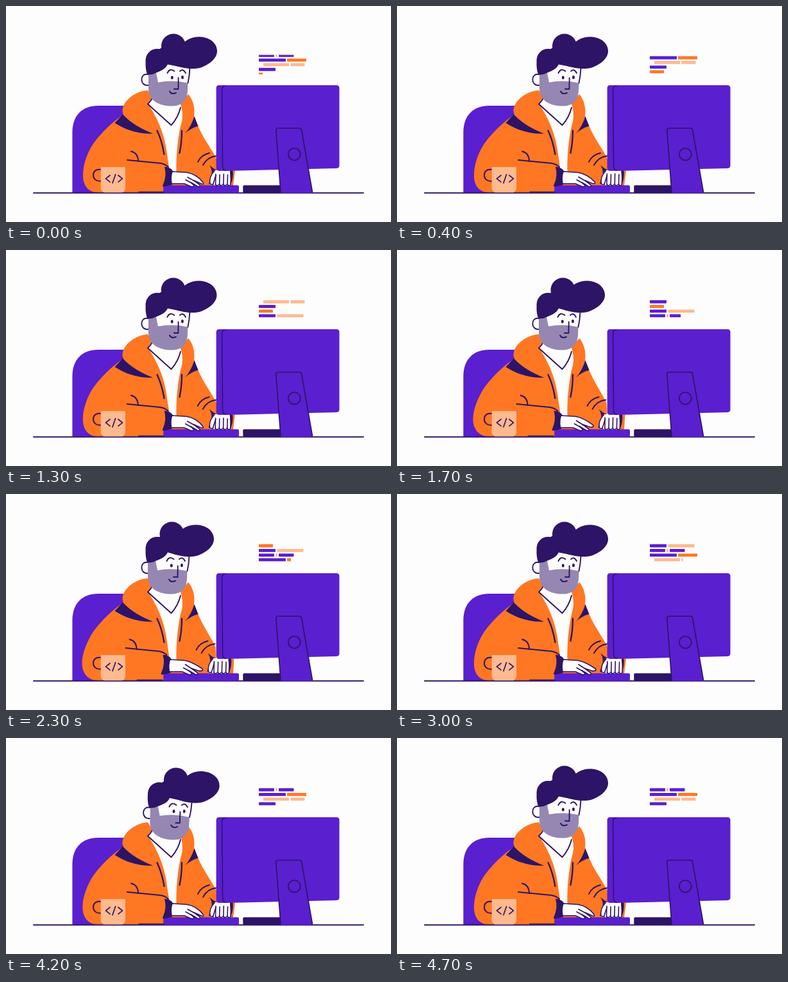
These frames come from a looping animation (600x338 px, 4800 ms). An HTML page with a canvas:

```html
<!DOCTYPE html>
<html lang="en">
<head>
<meta charset="utf-8">
<title>Developer at work</title>
<style>
html, body { margin: 0; width: 100%; height: 100%; overflow: hidden; background: #fefdfe; }
canvas { display: block; width: 600px; height: 338px; }
</style>
</head>
<body>
<canvas id="stage"></canvas>
<script>
const LOOP = 4800, STEP = 100;
const BG = '#fefdfe', PURPLE = '#5a1fcf', DARK = '#2d1466', ORANGE = '#ff7722',
      PEACH = '#ffb98e', BEARD = '#9587b2';

const canvas = document.getElementById('stage');
const ratio = window.devicePixelRatio || 1;
canvas.width = 600 * ratio;
canvas.height = 338 * ratio;
const c = canvas.getContext('2d');
c.scale(ratio, ratio);
c.lineCap = c.lineJoin = 'round';

function fill(d, color) {
  c.fillStyle = color;
  c.fill(new Path2D(d));
}
function line(d, width = 1.9, color = DARK) {
  c.strokeStyle = color;
  c.lineWidth = width;
  c.stroke(new Path2D(d));
}
function oval(x, y, rx, ry, color) {
  c.beginPath();
  c.ellipse(x, y, rx, ry, 0, 0, Math.PI * 2);
  c.fillStyle = color;
  c.fill();
}
function box(x, y, w, h, r, color) {
  c.beginPath();
  c.roundRect(x, y, w, h, r);
  c.fillStyle = color;
  c.fill();
}
function shifted(x, y, draw) {
  c.save();
  c.translate(x, y);
  draw();
  c.restore();
}
const clamp = v => Math.max(0, Math.min(1, v));
function ease(t, from, to) {
  const k = clamp((t - from) / (to - from));
  return k * k * (3 - 2 * k);
}

// Each row of code is a list of bars: x, width, colour
const rows = [
  [[394, 24, PURPLE], [420, 3, PEACH], [425, 23.5, PURPLE]],
  [[394, 42, PURPLE], [438, 30, ORANGE]],
  [[401, 40, PEACH], [443.5, 22, PEACH]],
  [[394, 26, PURPLE]],
  [[394, 22, ORANGE]],
  [[394, 26, PURPLE], [422.5, 41, PEACH]]
];
const starts = [-95, 600, 1400, 2070, 2765, 3380];
const SHOWN = 4, PITCH = 7.3;

function drawCode(t) {
  const scroll = starts.reduce((sum, s) => sum + ease(t, s, s + 190), 0);
  c.save();
  c.beginPath();
  c.rect(390, 76.5, 90, 30.5);
  c.clip();
  for (let i = 0; i < SHOWN + starts.length; i++) {
    const bars = rows[i % rows.length];
    const first = bars[0][0], last = bars[bars.length - 1];
    const typed = i < SHOWN ? 1 : clamp((t - starts[i - SHOWN]) / 340);
    const end = first + (last[0] + last[1] - first) * typed;
    const y = 81 + PITCH * (i - scroll);
    for (const [x, w, color] of bars) {
      const seen = Math.min(w, end - x);
      if (seen > 0) box(x, y - 2.4, seen, 4.8, 0.7, color);
    }
  }
  c.restore();
}

function drawBody(sway, lean) {
  const l = 120 - 1.5 * lean, r = -1.5 * sway;
  fill(`M221 132 C205 132 181 147 181.5 165 Q182 168 183 170
    C164 182 141 206 132 222 C124 237 ${l} 251 ${l} 265 C${l} 281 128 292 145 292
    L248 292 L248 281 L354 281 L${357 + r} 258 L${329 + r} 258 L${328 + r} 239
    C${322 + r} 226 306 205 299.5 188 L293 173 C295 158 291 146 284 138 L270 155 L235 155 Z`, ORANGE);
  fill('M228 143 L221 153 C233 170 246 196 250 225 L255 259 L265.5 259 C265 238 267 211 272 188 C276 176 276 166 272 153 L240 150 Z', BG);
  line('M228 144 Q226 149 221 153.5 L257.5 186.5 Q268 175 272 159');
  fill('M169.5 183 L182 169.5 C194 183 212 193 229 199.5 C208 201 186 194 169.5 183Z', DARK);
  fill('M293.5 172.5 L299.5 188 Q288 191 279 199.5 Q289 188 293.5 172.5Z', DARK);
  line('M235.5 195 Q243 211 246.5 232', 2.3);
  line('M274 195 Q274 213 270.5 230', 2.3);
}

function drawArms(sway) {
  shifted(-2.5 * sway, 0, () => {
    line('M195 227.5 Q206 230 206 243');
    line('M189 241 L240 246 Q248 247 253 252');
    line('M207 291 H246', 1.7);
    fill('M247 251.5 Q257 252 260.5 259 Q256 269 259 280 L247 282.5 Q243 283 244.5 280 Q251 266 247 251.5Z', DARK);
    line('M299 244 Q304 233 317 230');
    line('M307 249 Q314 236 328 234.5');
    fill('M317 249 Q323 258 319.5 267 L316 278 L321 280 L350 280 Q355 269 353.5 257 H329 Q322 254 317 249Z', DARK);
  });
  line('M148 256 C132 253 132 276 148 274', 1.9);
}

function drawHands(sway, open) {
  shifted(-3.5 * sway, 0, () => {
    const o = open * 2.5;
    const palm = `M259 259 L282 260.5 C291 262 300 267 ${307 + o} ${276 - o}
      Q${309 + o} ${280 - o} 304 ${278 - o / 2} L293 273 L302 280 Q303 284 298 282
      L288 276 L293 281 Q292 284 287 282 L278 278 L258 278 Q256 268 259 259Z`;
    fill(palm, BG);
    line(palm, 1.6);
    line(`M283 ${268 - o / 2} L294 274`, 1.6);
    line('M280 272 L289 277', 1.6);
  });
  shifted(-3.5 * sway + open, 0, () => {
    fill('M325 257 C319 263 317 272 318 279 Q321 282 323 279 L326 281 L349 281 Q351 281 350 270 L349 257Z', BG);
    line('M325 258 C319 264 317 272 318 278 Q321 281 323 278 L327 265', 1.6);
    for (let i = 0; i < 4; i++) {
      const x = 326.5 + i * 6.2;
      line(`M${x} 280 L${x + 0.4} ${263 + i % 2 - open}`, 1.6);
      line(`M${x} 279 Q${x + 2.7} 283 ${x + 5} 279`, 1.4);
    }
    line('M350 259 Q351 270 350 279', 1.6);
  });
}

function drawHair(sway) {
  fill('M217.8 84 C217 94 218 102 220.5 107.5 Q228 108 234 104.5 Q246 101 250 91 L280 97 L290 70 L262 50 L236 70Z', DARK);
  oval(235.5, 84.5, 17.8, 17.5, DARK);
  oval(261 - 2.5 * sway, 62.5, 19, 19, DARK);
  shifted(-5 * sway, 0, () => {
    fill(`M270 66 C279 51 293 47 305 48.5 C319 50 329 59 329 70.5
      C329 82 317 91 306 95.5 C292 101 272 97 255 90Z`, DARK);
  });
}

function drawHead(sway, nod, shut) {
  c.save();
  c.translate(225 + 4.4 * nod, 135 + 4 * nod);
  c.rotate(0.048 * nod);
  c.translate(-225, -135);

  fill('M223 107 C208 103 208 127 222 124Z', BG);
  line('M221.5 107 C208 104 208 126 221.5 124');
  fill('M223 90 H286 L283 130 H223Z', BG);
  shifted(-sway, 0, () => {
    fill(`M222 105 L234 104 L237 119.5 Q260 115 283.5 120.5 L283 133
      C282 149 274 156.5 258 156.5 C240 156.5 222 149 222 129Z`, BEARD);
    line('M286.5 97 Q286 110 283.5 120.5');
    line('M251.5 105 Q255 96.5 262.5 102');
    line('M271 102 Q276.5 97.5 280 105');
    if (shut) {
      line('M257 113.5 Q260 115 263 113.5', 1.1, BEARD);
      line('M273 113 Q276 114.5 279 113', 1.1, BEARD);
    } else {
      oval(258.8, 112, 2, 2.7, DARK);
      oval(275, 111.5, 2, 2.7, DARK);
    }
    line('M268.7 112.5 L268.5 130 L262 129.8');
    line('M255 133.5 Q257.5 139 265 136');
  });
  drawHair(sway);
  c.restore();
}

function drawDesk() {
  line('M43 292.5 H557', 1.9);
  box(369.3, 280.6, 60, 12, 2, DARK);
  box(245.3, 280.6, 117.7, 12, 2, PURPLE);
}

function drawMonitor() {
  fill('M332 124 H515 Q519.5 124 519.5 128.5 V249.5 Q519.5 253.7 515 254 L346 258 H332 Q327.6 258 327.6 253 V129 Q327.6 124 332 124Z', PURPLE);
  line('M342 125 Q336.5 125 336.6 131 L337.6 250 Q338 257 342.5 257.5', 1.5);
  const sides = 'M428 291 L420.8 195 Q420.5 191.3 424 191.3 H457 Q460 191.3 460.6 194 L477.5 291';
  fill(sides + ' V292.6 H428Z', PURPLE);
  line(sides, 1.6);
  c.beginPath();
  c.arc(449.3, 232, 9.5, 0, Math.PI * 2);
  c.lineWidth = 1.7;
  c.stroke();
}

function drawBadge() {
  fill('M147.7 252 H186 V285 Q186 290 181 291.7 H153 Q147.7 290 147.7 285Z', PEACH);
  line('M162 265 L155.5 270.2 L162 275.4 M170.6 263.5 L166 277 M175 265 L181.5 270.2 L175 275.4', 1.7);
}

function draw(t) {
  const sway = ease(t, 1200, 1700) - ease(t, 2400, 2950);
  const nod = ease(t, 3250, 3700) - ease(t, 3900, 4500);
  const busy = ease(t, 0, 300) - ease(t, 3300, 3600);
  const open = busy * (0.5 + 0.5 * Math.cos(Math.PI * 2 * (t - 900) / 700));
  const shut = t >= 3600 && t < 3900;

  c.fillStyle = BG;
  c.fillRect(0, 0, 600, 338);
  fill('M103.4 292 V198 C103.4 171 119 156 144 156 H192 V292Z', PURPLE);
  drawBody(sway, sway + 0.8 * nod);
  drawHead(sway, nod, shut);
  drawDesk();
  drawArms(sway);
  drawHands(sway, open);
  drawMonitor();
  drawBadge();
  drawCode(t);
}

function tick() {
  const t = performance.now() % LOOP;
  draw(Math.floor(t / STEP) * STEP);
  requestAnimationFrame(tick);
}
tick();
</script>
</body>
</html>
```
